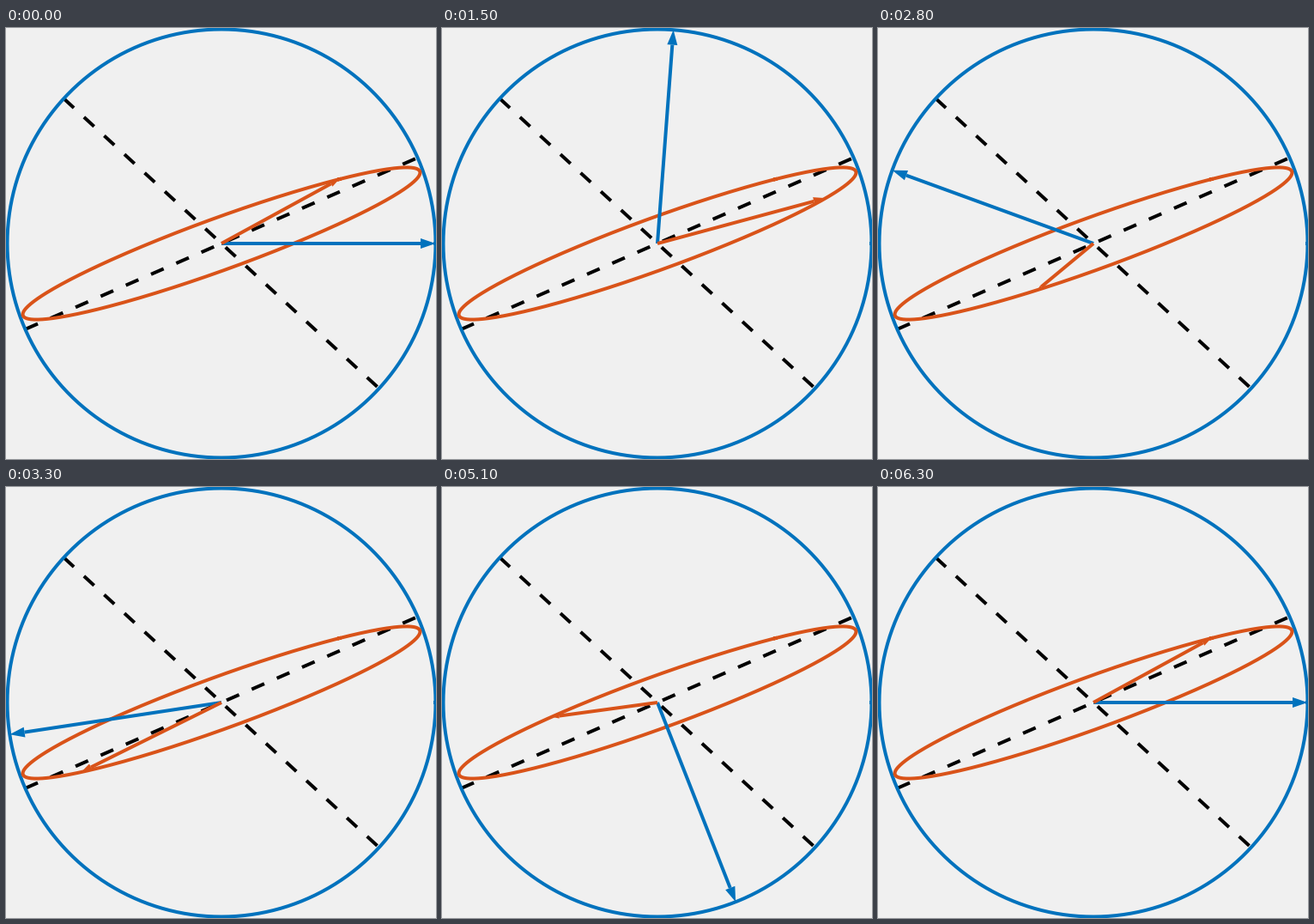
Write a matplotlib script that moves like this. It is 501 px wide and 502 px high and loops after 6400 ms.

```python
import numpy as np
import matplotlib.pyplot as plt
from matplotlib.animation import FuncAnimation
from matplotlib.patches import Polygon

W, H = 501, 502
DPI = 64
FRAMES = 64
INTERVAL = 100

CENTER = np.array([251.0, 251.0])
RADIUS = 249.5
MATRIX = np.array([[0.55, 0.747],
                   [0.30, 0.19]])

BLUE = "#0072BD"
RED = "#D95319"
LINE = 4 * 72 / DPI  # 4 pixels in points
HEAD_LENGTH = 0.07   # relative to the arrow
HEAD_HALF = 0.024


def to_stage(points):
    """Map unit coordinates (y up) to stage pixels (y down)."""
    return CENTER + RADIUS * np.asarray(points) * [1, -1]


def unit(angle):
    return np.array([np.cos(angle), np.sin(angle)])


fig = plt.figure(figsize=(W / DPI, H / DPI), dpi=DPI, facecolor="#F0F0F0")
ax = fig.add_axes([0, 0, 1, 1])
ax.set_xlim(0, W)
ax.set_ylim(H, 0)
ax.axis("off")


def draw_line(points, color, **style):
    x, y = to_stage(points).T
    return ax.plot(x, y, color=color, lw=LINE, snap=False, **style)[0]


class Arrow:
    def __init__(self, color, zorder):
        self.shaft = draw_line([[0, 0], [1, 0]], color, zorder=zorder,
                               solid_capstyle="butt")
        self.head = Polygon(np.zeros((3, 2)), fc=color, ec="none",
                            zorder=zorder)
        ax.add_patch(self.head)

    def point_to(self, tip):
        base = tip * (1 - HEAD_LENGTH)
        side = np.array([-tip[1], tip[0]]) * HEAD_HALF
        self.shaft.set_data(*to_stage([[0, 0], base]).T)
        self.head.set_xy(to_stage([tip, base + side, base - side]))


# Eigenvector directions, drawn left to right
_, vectors = np.linalg.eig(MATRIX)
for v in vectors.T:
    v = v * np.sign(v[0])
    draw_line([-v, v], "black", linestyle=(0, (4, 4)),
              dash_capstyle="butt", zorder=1)

# Unit circle and its image under the matrix
circle = np.array([unit(a) for a in np.linspace(0, 2 * np.pi, 361)])
draw_line(circle, BLUE, zorder=2)
draw_line(circle @ MATRIX.T, RED, zorder=3)

vector = Arrow(BLUE, 4)
image = Arrow(RED, 5)


def update(frame):
    v = unit(2 * np.pi * frame / (FRAMES - 1))
    vector.point_to(v)
    image.point_to(MATRIX @ v)
    return vector.shaft, vector.head, image.shaft, image.head


anim = FuncAnimation(fig, update, frames=FRAMES, interval=INTERVAL,
                     repeat=True, repeat_delay=0)
plt.show()
```
